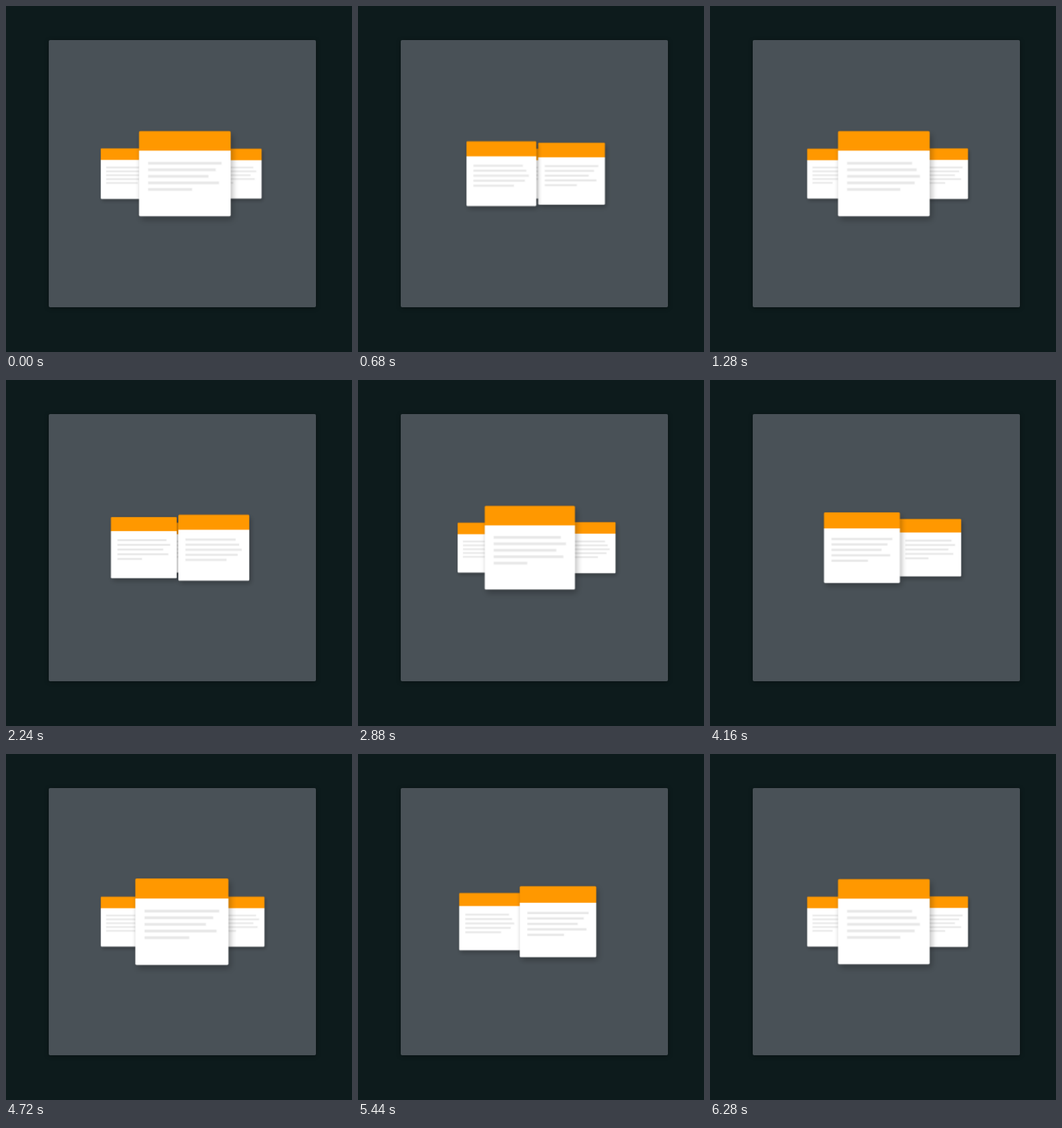
An HTML page for the animation above (6320 ms loop, 518 by 518 pixels).

```html
<!DOCTYPE html>
<html lang="en">
<head>
<meta charset="utf-8">
<title>Card carousel</title>
<style>
  html, body {
    margin: 0;
    width: 100%;
    height: 100%;
    overflow: hidden;
    background: #0d1b1c;
  }
  .panel {
    position: absolute;
    left: 64px;
    top: 51px;
    width: 400px;
    height: 400px;
    border-radius: 2px;
    background: #495157;
    box-shadow: 0 1px 6px rgba(0, 0, 0, .35);
    perspective: 1000px;
  }
  .ring {
    position: absolute;
    inset: 0;
    transform-style: preserve-3d;
  }
  .card {
    position: absolute;
    left: 130px;
    top: 135px;
    width: 140px;
    height: 130px;
    border-radius: 2px;
    background: linear-gradient(#ff9800 30px, #fff 30px);
    box-shadow: 0 0 1px rgba(0, 0, 0, .3), 3px 5px 10px rgba(0, 0, 0, .28);
    /* --t is the clock in ms, --lead the card's place in the cycle */
    animation: orbit 5s ease-in-out infinite paused;
    animation-delay: calc((var(--t, 0) + var(--lead)) * -1ms);
  }
  .card i {
    position: absolute;
    left: 14px;
    height: 4px;
    background: #e8e8e8;
  }
  @keyframes orbit {
    0%, 100% { transform: translate3d(0, 0, 0); }
    33.3333% { transform: translate3d(144px, 0, -739px); }
    66.6667% { transform: translate3d(-144px, 0, -739px); }
  }
</style>
</head>
<body>
<div class="panel"><div class="ring"></div></div>
<script>
  const LOOP = 6320;
  const CYCLE = 5000;
  const START = 192;
  const TEXT_WIDTH = 112;

  // Line lengths in percent of the text width
  const cards = [
    [100, 92, 82, 96, 60],
    [88, 95, 99, 92, 72],
    [93, 100, 87, 96, 46]
  ];

  const ring = document.querySelector('.ring');

  cards.forEach((lines, n) => {
    const card = document.createElement('div');
    card.className = 'card';
    card.style.setProperty('--lead', START + CYCLE * (3 - n) / 3 % CYCLE);
    lines.forEach((percent, row) => {
      const line = document.createElement('i');
      line.style.top = 47 + row * 10 + 'px';
      line.style.width = TEXT_WIDTH * percent / 100 + 'px';
      card.append(line);
    });
    ring.append(card);
  });

  const begin = performance.now();

  function draw() {
    const t = (performance.now() - begin) % LOOP;
    ring.style.setProperty('--t', t.toFixed(2));
    requestAnimationFrame(draw);
  }
  draw();
</script>
</body>
</html>
```
